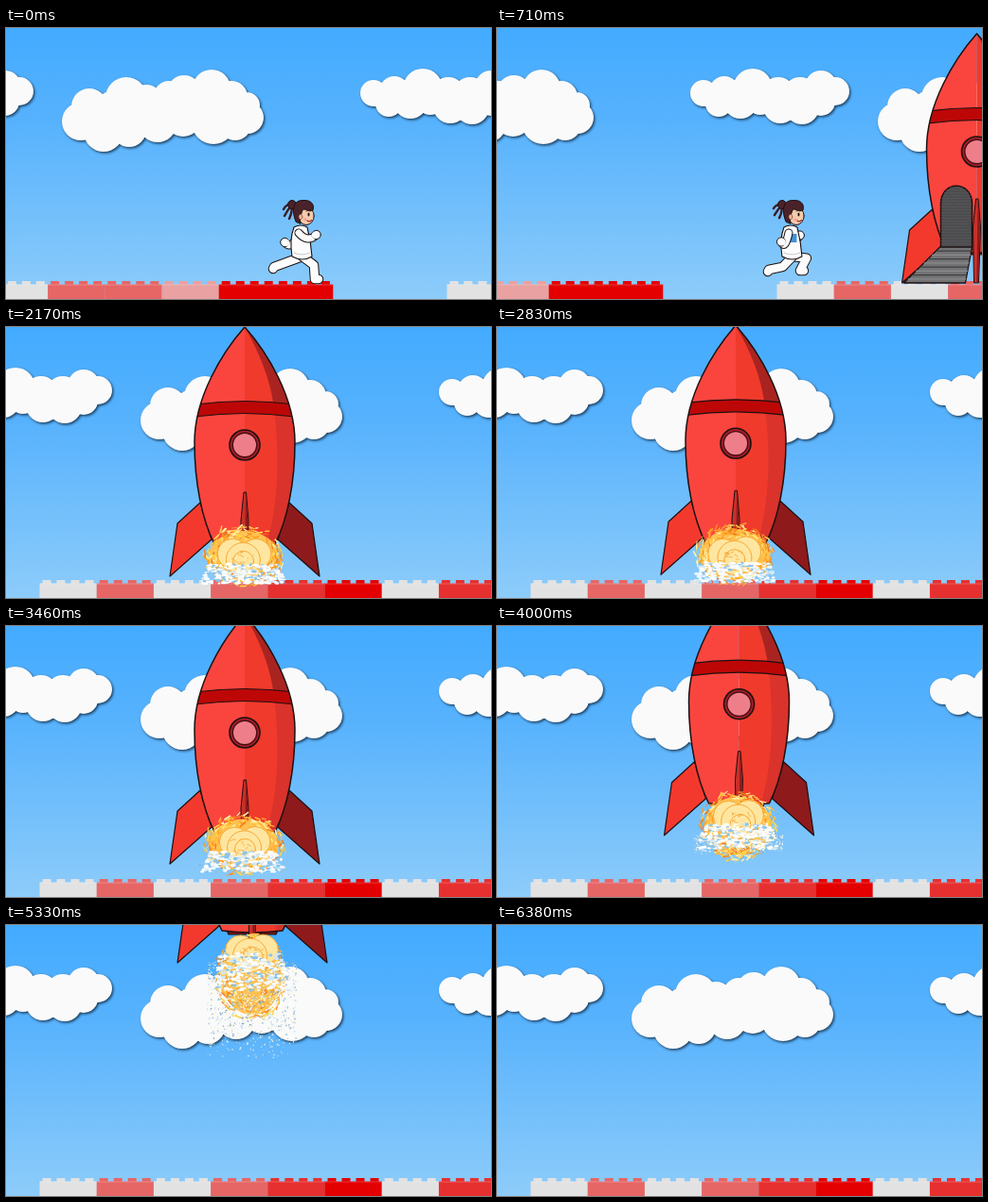
An HTML page with a canvas for the animation above (6.43 s loop, 512 px wide and 287 px high).

```html
<!DOCTYPE html>
<html lang="en">
<head>
<meta charset="utf-8">
<title>Rocket launch</title>
<style>
html, body { margin: 0; width: 100%; height: 100%; overflow: hidden; background: #6bbcfc; }
canvas { display: block; width: 100vw; height: 100vh; }
</style>
</head>
<body>
<canvas id="stage" width="512" height="287"></canvas>
<script>
const ctx = document.getElementById('stage').getContext('2d');
const W = 512, H = 287, LOOP = 6430, STEP = 1000 / 24, LAST = 153;
const INK = '#1c1011';

const clamp = (v, a = 0, b = 1) => Math.min(b, Math.max(a, v));
const mix = (a, b, k) => a + (b - a) * k;

function random(seed) {
  let s = seed * 7919 + 17;
  return () => {
    s = (s + 0x6D2B79F5) | 0;
    let v = Math.imul(s ^ (s >>> 15), 1 | s);
    v = (v + Math.imul(v ^ (v >>> 7), 61 | v)) ^ v;
    return ((v ^ (v >>> 14)) >>> 0) / 4294967296;
  };
}

// Smooth curve through [step, value] keys.
function curve(keys, n) {
  const end = keys.length - 1;
  if (n <= keys[0][0]) return keys[0][1];
  if (n >= keys[end][0]) return keys[end][1];
  let i = 0;
  while (n > keys[i + 1][0]) i++;
  const slope = j => {
    const a = keys[Math.max(0, j - 1)], b = keys[Math.min(end, j + 1)];
    return j ? (b[1] - a[1]) / (b[0] - a[0]) : 0;
  };
  const [x0, y0] = keys[i], [x1, y1] = keys[i + 1];
  const d = x1 - x0, u = (n - x0) / d, u2 = u * u, u3 = u2 * u;
  return y0 * (2 * u3 - 3 * u2 + 1) + y1 * (3 * u2 - 2 * u3)
    + d * (slope(i) * (u3 - 2 * u2 + u) + slope(i + 1) * (u3 - u2));
}

function paint(path, fill, line = INK, width = 1.2) {
  if (fill) { ctx.fillStyle = fill; ctx.fill(path); }
  if (line) { ctx.strokeStyle = line; ctx.lineWidth = width; ctx.stroke(path); }
}
const shape = (d, ...style) => paint(new Path2D(d), ...style);
function oval(x, y, rx, ry, ...style) {
  const p = new Path2D();
  p.ellipse(x, y, rx, ry, 0, 0, Math.PI * 2);
  paint(p, ...style);
}

// ---- scenery ----
function cloudPath(circles) {
  const p = new Path2D();
  for (const [x, y, r] of circles) {
    p.moveTo(x + r, y);
    p.arc(x, y, r, 0, Math.PI * 2);
  }
  return p;
}
const bigCloud = cloudPath([
  [20, 99, 20], [29, 83, 19], [44, 110, 21], [68, 74, 22], [71, 108, 18], [89, 78, 18],
  [101, 101, 20], [113, 72, 16], [129, 68, 18], [128, 96, 19], [158, 64, 20], [160, 100, 23],
  [179, 73, 17], [195, 82, 14], [183, 102, 17], [196, 95, 17], [58, 90, 25], [108, 86, 24], [158, 82, 24]
]);
const smallCloud = cloudPath([
  [14, 69, 14], [36, 67, 16], [30, 80, 14], [66, 64, 21], [53, 78, 18], [74, 76, 16], [93, 70, 18],
  [95, 83, 18], [116, 70, 18], [118, 84, 18], [138, 62, 17], [138, 78, 15], [153, 67, 15], [116, 72, 16]
]);

function cloud(path, x) {
  ctx.save();
  ctx.translate(x, 0);
  ctx.shadowColor = 'rgba(10,30,50,.8)';
  ctx.shadowBlur = 3;
  ctx.shadowOffsetX = 1.3;
  ctx.shadowOffsetY = 1.5;
  ctx.fillStyle = '#fafafa';
  ctx.fill(path);
  ctx.restore();
}

function sky(scroll) {
  const g = ctx.createLinearGradient(0, 0, 0, H);
  g.addColorStop(0, '#43abff');
  g.addColorStop(.35, '#57b2fd');
  g.addColorStop(1, '#8dccfa');
  ctx.fillStyle = g;
  ctx.fillRect(0, 0, W, H);
  for (let k = -1; k < 3; k++) {
    cloud(smallCloud, 374 + 513 * k - scroll);
    cloud(bigCloud, 59 + 513 * k - scroll);
  }
}

// Brick colours from left to right; a dash is a hole.
const TINTS = { w: '#e2e2e2', p: '#e66666', l: '#e9a1a1', r: '#e40000', m: '#e63030' };
const ROW = 'wpplrr--wpwpmrwmm';
function ground(scroll) {
  [...ROW].forEach((c, i) => {
    const x = 465.5 + 60.2 * (i - 8) - scroll;
    if (c === '-' || x > W || x < -62) return;
    ctx.fillStyle = TINTS[c];
    ctx.fillRect(x, 271.5, 60.4, 16);
    for (let j = 0; j < 4; j++) ctx.fillRect(x + 3 + j * 15, 268, 9, 4);
    ctx.fillStyle = 'rgba(255,255,255,.22)';
    ctx.fillRect(x, 271.5, 60.2, 1);
  });
}

// ---- rocket, drawn around its window ----
const BODY = 'M0-125C-24-98-53-50-53-3C-53 40-45 79-32 105Q0 109 32 105C45 79 53 40 53-3C53-50 24-98 0-125Z';
const FIN = 'M47 61L71 83L79 139L35 100Z';
const DOOR = 'M-38 104V55C-38 30-5 30-5 55V104Z';

function rocket(n) {
  ctx.lineJoin = 'round';
  shape(FIN, '#8e1a1c');
  ctx.save();
  ctx.scale(-1, 1);
  shape(FIN, '#f3392d');
  ctx.restore();
  shape('M-28 102H28L25 109H-25Z', '#7d1517');

  const body = new Path2D(BODY);
  ctx.save();
  ctx.clip(body);
  ctx.fillStyle = '#fa453f';
  ctx.fillRect(-60, -130, 60, 250);
  ctx.fillStyle = '#f03a2c';
  ctx.fillRect(0, -130, 60, 250);
  shape('M0-125C15-98 27-72 31-38L60-38V-130Z', '#a92420', null);
  shape('M31-38C38 20 34 70 22 110H60V-38Z', '#d9332b', null);
  shape('M-60-42Q0-51 60-42V-29Q0-38-60-29Z', '#bd0707');
  ctx.restore();
  paint(body, null, INK, 1.5);
  oval(0, 0, 16, 16, '#a51e28', INK, 1.6);
  oval(0, 0, 12.7, 12.7, '#ee7f8a', '#4a0e15', 1.4);

  const open = 1 - clamp((n - 43) / 4);
  if (open > 0) {
    ctx.save();
    ctx.globalAlpha = open;
    shape(DOOR, '#4d4c4e', INK, 1.5);
    ctx.clip(new Path2D(DOOR));
    ctx.fillStyle = '#626264';
    for (let y = 34; y < 104; y += 3)
      for (let x = -38 + y % 2; x < -5; x += 3) ctx.fillRect(x, y, 1, 1);
    ctx.restore();
  }
  const ramp = 1 - clamp((n - 39) / 5);
  if (ramp > 0) {
    const edge = k => [mix(-39, -77, k * ramp), mix(-5, -12, k * ramp), 101 + 38 * k * ramp];
    const [l, r, y] = edge(1);
    shape(`M-39 101H-5L${r} ${y}H${l}Z`, '#737375', INK, 1.3);
    for (let i = 1; i < 9; i++) {
      const [a, b, h] = edge(i / 9);
      shape(`M${a} ${h}H${b}`, null, i % 2 ? '#3e3e40' : '#8a8a8c', 1.2);
    }
  }
  shape('M-1 50H1.5L4 80L2 139H-3L-4 80Z', '#c9302a', INK, 1);
  shape('M1 52L3.4 80L1.5 138H0Z', '#8e1a1c', null);
}

// ---- exhaust ----
function flame(n) {
  const rnd = random(n), spread = v => (rnd() * 2 - 1) * v;
  const pick = list => list[Math.floor(rnd() * list.length)];
  const g = Math.max(0, (n - 82) / 46), size = clamp((n - 45) / 4);
  ctx.save();
  ctx.translate(-1, 105);
  ctx.scale(size, size);
  ctx.translate(0, -105);

  // Fire ball with short swirling streaks
  const cy = 118 + 36 * g, rx = 40 - 5 * g, ry = 30 + 13 * g;
  oval(0, cy, rx - 3, ry - 3, '#ffc14f', null);
  ctx.lineCap = 'round';
  for (let i = 0; i < 320; i++) {
    const a = rnd() * Math.PI * 2, d = .4 + Math.sqrt(rnd()) * .66;
    const x = Math.cos(a) * rx * d, y = cy + Math.sin(a) * ry * d, turn = a + 1.6 + spread(.7);
    const len = 2 + rnd() * 5;
    shape(`M${x} ${y}l${Math.cos(turn) * len} ${Math.sin(turn) * len}`, null,
      pick(['#ff9a1e', '#f27a1c', '#ffd648', '#fff0a6', '#ffb73a']), .7 + rnd());
  }

  // Fine spray, longer as the rocket speeds up
  for (let i = 0; i < 1500 * g; i++) {
    const s = .6 + rnd() * .9, fall = rnd() * (.6 + .4 * rnd());
    ctx.fillStyle = pick(['#fff', '#eef4f8', '#bcd5e4', '#7fa9c4', '#fff2c0']);
    ctx.fillRect(spread(47), mix(138, 150 + 92 * g * g, fall), s, s);
  }

  const py = 115 + 10 * g;
  for (const [x, y, r] of [[-11, 1, 16], [12, 0, 16], [0, 6, 18], [1, 9, 11]])
    oval(x + spread(1.5), py + y + spread(1), r, r, '#ffe6a0', '#f6a936', 1);
  for (let i = 0; i < 18; i++)
    shape(`M${spread(13)} ${py + 6 + spread(9)}l${spread(4)} ${spread(3)}`, null, '#f2a83c', .8);

  // Foam
  const top = 126 + 3 * g, bottom = 147 + 21 * g;
  for (let i = 0; i < 270; i++) {
    const k = rnd(), w = mix(36, 45, k) - 3 * g;
    oval(spread(w), mix(top, bottom, k), 1.2 + rnd() * 2.2, .7 + rnd(),
      pick(['#fff', '#fff', '#fff', '#f3f8fb', '#d3e7f4', '#8cc4e8']), null);
  }
  ctx.restore();
}

// ---- runner ----
// Foot places over one stride: x from the hip, y on the stage.
const STRIDE = [[13, 266], [9, 264], [4, 259], [-6, 262], [-15, 263], [-25, 256],
  [-30, 253], [-29, 253], [-20, 259], [-10, 254], [0, 251], [8, 257]];

function limb(d, width) {
  ctx.lineCap = ctx.lineJoin = 'round';
  shape(d, null, INK, width + 2);
  shape(d, null, '#fcfcfc', width);
}
function leg(step) {
  const [dx, fy] = STRIDE[step % STRIDE.length], hx = 313, hy = 242;
  const dy = fy - hy, d = Math.hypot(dx, dy);
  const bend = Math.sqrt(Math.max(0, 225 - d * d / 4));
  const kx = hx + dx / 2 + dy / d * bend, ky = hy + dy / 2 - dx / d * bend;
  limb(`M${hx} ${hy}L${kx} ${ky}L${hx + dx} ${fy}l${dx < -15 ? '-1 2' : '4 0'}`, 8.5);
}
function arm(angle) {
  const x = 311 + 19 * Math.cos(angle - .5), y = 223 - 4 * Math.cos(angle);
  limb(`M309 217Q${(309 + x) / 2} ${y + 9} ${x} ${y}`, 7);
  oval(x, y, 4.6, 4.6, '#fcfcfc', INK, 1);
  oval(x - Math.sign(x - 311) * 1.5, y + .5, 3.4, 3.4, '#fcfcfc', null);
}

function head(swing) {
  ctx.lineCap = 'round';
  for (const [x, y] of [[293, 192], [294, 199], [299, 202]])
    shape(`M302 187Q${x + 3} ${y - 6} ${x} ${y + swing}`, null, '#3a1c22', 2.4);
  oval(302, 187, 4.5, 4.5, '#4b2229', INK, 1);
  oval(317, 199, 8.2, 9.5, '#f5cbab', INK, 1);
  shape('M306 205C300 190 305 182 314 182.500C322 182 326 187 324 193C319 195 315 190 313 193C312 197 309 200 311 207Z',
    '#4b2229', INK, 1);
  oval(311, 200, 2, 2.7, '#f0bb9a', '#70423a', .6);
  oval(319.5, 197.500, 1, 1.9, '#211416', null);
  shape('M317 194q2-2 4 0', null, '#3a1c22', .9);
  shape('M318 204q2 2 4.500-.5', null, '#a52929', 1.2);
  oval(316, 203, 1.9, 1.4, '#f0a595', null);
}

function runner(n) {
  if (n >= 39) return;
  const p = n * Math.PI * 2 / STRIDE.length, climb = clamp((n - 32) / 6);
  const drift = n < 32 ? -2 * (n / 32) : mix(-2, -31, climb);
  ctx.save();
  ctx.globalAlpha = 1 - clamp((n - 35) / 4);
  ctx.translate(311 + drift, 268 - 32 * climb);
  ctx.scale(1 - .15 * climb, 1 - .15 * climb);
  ctx.translate(-311, -268);
  arm(p + Math.PI);
  leg(n + STRIDE.length / 2);
  leg(n);
  shape('M304 211Q311 207 318 211Q322 227 323 242Q313 248 302 242Q299 224 304 211Z', '#fcfcfc', INK, 1.1);
  shape('M304 238Q312 242 321 238', null, '#b9b9bd', .8);
  // The chest patch shows while the near arm swings back.
  if (Math.cos(p) < .4) {
    ctx.fillStyle = '#3f92d8';
    ctx.fillRect(309.5, 218, 8, 9);
  }
  arm(p);
  head(Math.sin(p * 2));
  ctx.restore();
}

// ---- timeline ----
const LIFT = [[45, 0], [52, 6], [83, 18], [108, 95], [128, 230], [153, 470]];
const SWAY = [[43, 0], [52, 5.5], [83, 5.5], [108, 12.5], [128, 13.5], [153, 13.5]];

function draw(now) {
  const n = Math.min(LAST, Math.floor((now % LOOP + 5) / STEP));
  const scroll = Math.min(430, n * 10);
  sky(scroll);
  ground(scroll);
  if (n < 150) {
    ctx.save();
    ctx.translate(676.5 - scroll + curve(SWAY, n), 131 - curve(LIFT, n));
    rocket(n);
    if (n > 45) flame(n);
    ctx.restore();
  }
  runner(n);
}

let start = null;
function tick(now) {
  start ??= now;
  draw(now - start);
  requestAnimationFrame(tick);
}
draw(0);
requestAnimationFrame(tick);
</script>
</body>
</html>
```
